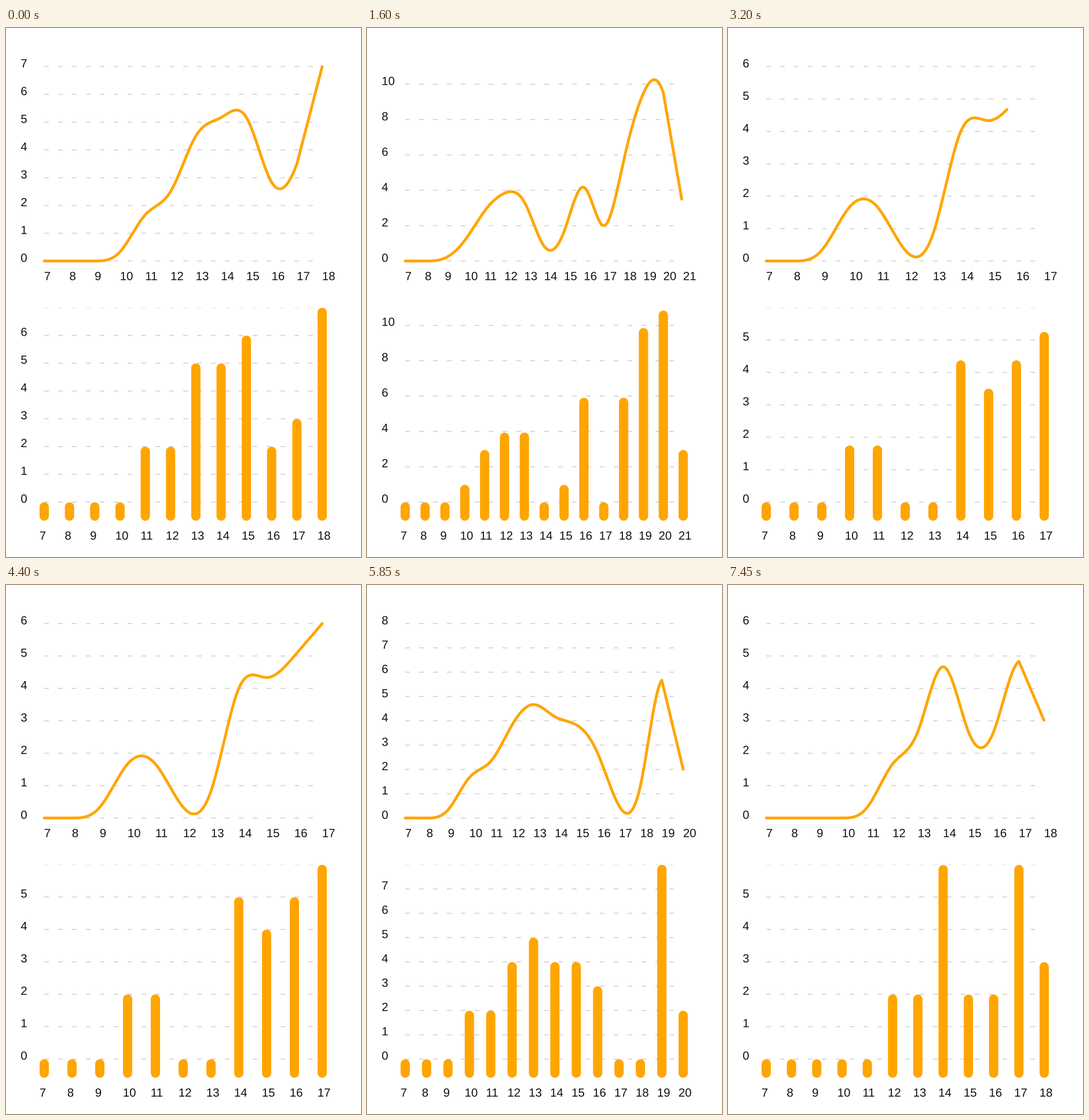
A matplotlib script that plays this animation: 613 by 914 pixels, repeating every 7840 ms.

```python
import numpy as np
import matplotlib.pyplot as plt
from matplotlib.animation import FuncAnimation
from matplotlib.collections import LineCollection
from matplotlib.patches import PathPatch
from matplotlib.path import Path
from matplotlib.textpath import TextPath

W, H, DPI = 613, 914, 64
PX = 72 / DPI
LOOP, TICK, STEP = 7840, 20, 50

X0, X1, SPAN = 66, 546, 336
LINE_BASE, BAR_BASE = 402.6, 819.2
ORANGE, GREY, INK = "#FFA500", "#D0D0D0", "#111111"

# values from hour 7 on, label step, shown from, growth start, duration, easing handles
CHARTS = [
    ([0, 0, 0, 0, 2, 2, 5, 5, 6, 2, 3, 7], 1, 0, -1000, 1000, (0.4, 0.2)),
    ([0, 0, 0, 1, 3, 4, 4, 0, 1, 6, 0, 6, 10, 11, 3], 2, 300, 300, 1350, (1.0, 0.8)),
    ([0, 0, 0, 2, 2, 0, 0, 5, 4, 5, 6], 1, 2600, 2600, 1000, (0.4, 0.2)),
    ([0, 0, 0, 2, 2, 4, 5, 4, 4, 3, 0, 0, 8, 2], 1, 4450, 4485, 1000, (0.4, 0.2)),
    ([0, 0, 0, 0, 0, 2, 2, 6, 2, 2, 6, 3], 1, 6500, 6495, 1000, (0.4, 0.2)),
]


def ease(t, handles):
    """Cubic Bezier easing with handles (a, 0) and (b, 1)."""
    a, b = handles
    s = np.linspace(0, 1, 400)
    x = 3 * (1 - s) ** 2 * s * a + 3 * (1 - s) * s ** 2 * b + s ** 3
    return np.interp(t, x, s * s * (3 - 2 * s))


def spline(d):
    """Cubic B-spline through the inner knots, straight at both ends."""
    u = np.linspace(0, 1, 24, endpoint=False)
    xs, ys = [[0]], [[d[0]]]
    for i in range(1, len(d) - 2):
        a, b, c, e = d[i - 1:i + 3]
        xs.append(i + u)
        ys.append(((1 - u) ** 3 * a + (3 * u ** 3 - 6 * u ** 2 + 4) * b
                   + (-3 * u ** 3 + 3 * u ** 2 + 3 * u + 1) * c + u ** 3 * e) / 6)
    n = len(d)
    xs.append([n - 2, n - 1])
    ys.append([(d[-3] + 4 * d[-2] + d[-1]) / 6, d[-1]])
    return np.concatenate(xs), np.concatenate(ys)


def label(x, y, value):
    glyphs = TextPath((0, 0), str(value), size=20.4, prop={"family": "Liberation Sans"})
    return Path(glyphs.vertices * (1, -1) + (x, y), glyphs.codes)


def dashes(y):
    return [[(x, y), (x + 8, y)] for x in range(X0, X1 - 8, 24)]


class Chart:
    def __init__(self, ax, values, step, shown, start, duration, handles):
        self.shown, self.start = shown, start
        self.duration, self.handles = duration, handles
        top = max(values)
        unit = SPAN / top
        self.heights = np.array(values) * unit
        self.x = np.linspace(X0, X1, len(values))

        kx, ky = spline(values)
        self.lx = X0 + kx * (X1 - X0) / (len(values) - 1)
        self.ly = LINE_BASE - ky * unit
        run = np.hypot(np.diff(self.lx), np.diff(self.ly))
        self.length = np.concatenate([[0], np.cumsum(run)])

        segs, faint, texts = [], [], []
        for v in range(0, top + 1, step):
            yl, yb = LINE_BASE - v * unit, BAR_BASE - v * unit
            segs += dashes(yl)
            texts.append(label(25.3, yl + 1.4, v))
            if v < top:
                segs += dashes(yb)
                texts.append(label(25.3, yb + 0.9, v))
            else:
                faint += dashes(yb + 0.4)
        for i, x in enumerate(self.x):
            texts.append(label(x - 0.2, 435.6, 7 + i))
            texts.append(label(x - 8.2, 884, 7 + i))

        self.layer = [
            LineCollection(segs, colors=GREY, linewidths=1.6 * PX, zorder=1),
            LineCollection(faint, colors="#E2E2E2", linewidths=0.9 * PX, zorder=1),
            PathPatch(Path.make_compound_path(*texts), fc=INK, lw=0, zorder=4),
        ]
        for art in self.layer:
            art.set_snap(False)
            ax.add_artist(art)

    def show(self, on):
        for art in self.layer:
            art.set_visible(on)

    def progress(self, t):
        return float(ease(np.clip((t - self.start) / self.duration, 0, 1), self.handles))

    def bars(self, p):
        return [[(x, 843.4), (x, BAR_BASE + 8.2 - h * p)]
                for x, h in zip(self.x, self.heights)]

    def curve(self, p):
        if p <= 0:
            return [], []
        end = max(p * self.length[-1], 0.1)
        keep = self.length < end
        tip = [np.interp(end, self.length, c) for c in (self.lx, self.ly)]
        return np.append(self.lx[keep], tip[0]), np.append(self.ly[keep], tip[1])


fig = plt.figure(figsize=(W / DPI, H / DPI), dpi=DPI, facecolor="white")
ax = fig.add_axes([0, 0, 1, 1])
ax.set(xlim=(0, W), ylim=(H, 0))
ax.axis("off")

charts = [Chart(ax, *spec) for spec in CHARTS]
bars = LineCollection([], colors=ORANGE, linewidths=16 * PX, capstyle="round", zorder=2)
bars.set_snap(False)
ax.add_artist(bars)
curve, = ax.plot([], [], color=ORANGE, lw=4.8 * PX, solid_capstyle="round",
                 solid_joinstyle="round", zorder=3, snap=False)


def draw(i):
    t = (i * TICK + 10) // STEP * STEP
    now = [c for c in charts if c.shown <= t][-1]
    for c in charts:
        c.show(c is now)
    p = now.progress(t)
    bars.set_segments(now.bars(p))
    curve.set_data(*now.curve(p))
    return bars, curve


anim = FuncAnimation(fig, draw, frames=LOOP // TICK, interval=TICK,
                     init_func=lambda: draw(0), repeat=True, repeat_delay=0)
plt.show()
```
